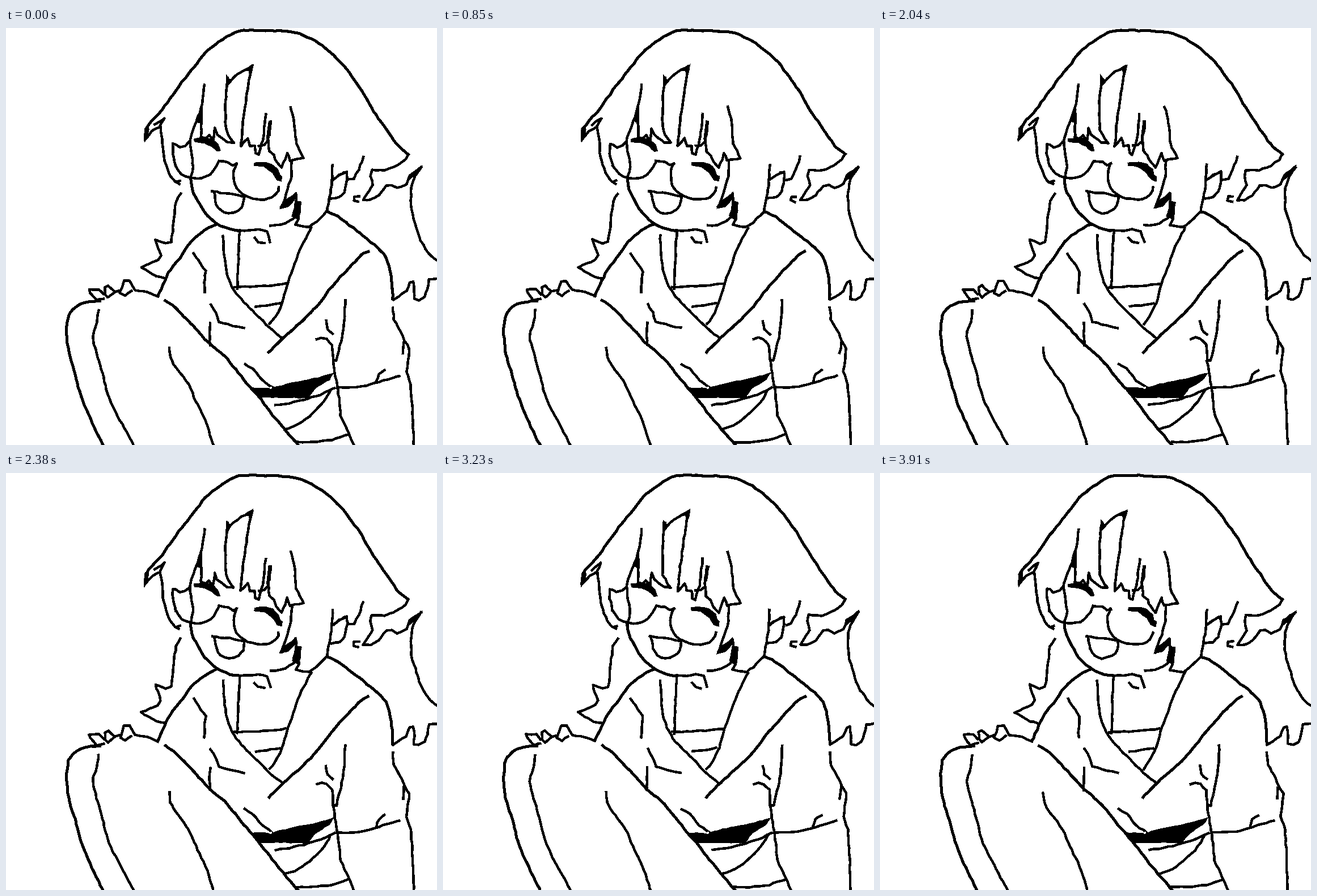
Recreate the animation shown at these times as an HTML page. Size 760 by 737 pixels, loop 4.08 s.

```html
<!DOCTYPE html>
<html lang="en">
<head>
<meta charset="utf-8">
<title>Boiling line drawing</title>
<style>
  html, body { margin: 0; width: 100%; height: 100%; overflow: hidden; background: #fff; }
  svg { display: block; width: 100vw; height: 100vh; }
  polyline { fill: none; stroke: #000; stroke-width: 4.5; stroke-linecap: square; stroke-linejoin: round; }
  .bold { stroke-width: 5.1; }
  polygon { fill: #000; stroke: #000; stroke-width: 1.5; }
</style>
</head>
<body>
<svg viewBox="0 0 760 737" preserveAspectRatio="none" shape-rendering="crispEdges">
  <!-- "soft" lines are curves through their points, the others keep their corners -->
  <g id="hair">
    <polyline class="soft bold" points="247,178 258,163 270,151 285,131 300,110 325,77 337,63 352,43 375,25 395,12 412,5 440,4 465,5 490,6 517,10 545,23 565,37 590,60 610,86 628,111 645,141 665,171 680,193 692,209 709,223"/>
    <polyline points="709,223 704,233 690,243 668,252 645,251 643,262 647,278 640,288 630,304 643,304 657,296 670,279 680,278 690,283 696,281 706,276 712,262 732,246"/>
    <polygon points="707,272 711,259 734,243 720,261"/>
    <polyline class="soft" points="732,246 722,262 715,283 715,320 722,345 731,375 736,384 748,401 760,411"/>
    <polyline points="760,443 746,444 743,462 738,475 728,481 719,479 720,465 718,448 712,450 706,465 692,474 683,480"/>
    <polyline points="622,298 614,298 613,305 621,307"/>
    <polyline points="247,178 245,197 258,182 271,175 279,159 263,171"/>
    <polygon points="244,201 245,178 252,173 251,186"/>
    <polyline class="soft" points="272,176 275,195 277,220 282,242 290,261 298,272 305,275"/>
    <polyline points="300,272 306,270"/>
    <polyline points="308,293 300,306 296,335 294,360 291,378 282,381 264,374 268,388 273,402 268,410 238,423 250,430 265,439 279,442"/>
  </g>
  <g id="bangs">
    <polyline class="soft" points="350,100 347,125 341,150 330,180 324,200 327,225 330,245 326,262"/>
    <polygon points="346,138 338,166 346,168"/>
    <polyline points="344,145 344,190"/>
    <polyline points="344,193 352,195 358,190 364,198 365,203 368,177 372,188 380,194 390,202 402,203 396,196 388,180 387,160 387,130 391,88"/>
    <polyline points="391,100 400,89 415,77 434,67 430,85 425,115 422,140 418,165 414,209 426,195 430,208 438,208 440,221 445,224 448,213 453,198 455,178 458,152"/>
    <polygon points="389,84 397,93 388,102"/>
    <polygon points="420,75 436,65 430,84 428,75"/>
    <polyline points="467,166 463,185 462,200 455,207 446,208"/>
    <polygon points="464,164 469,164 466,190 460,195"/>
    <polyline points="462,195 464,218 472,225 477,236 486,247 492,232 496,221 501,234 525,230 518,217 512,205 508,160 502,140"/>
    <polyline points="504,237 503,262 497,285 488,311 485,317 497,313 511,293 512,308 519,309 516,338 511,348 522,350 535,352 547,343 566,324"/>
    <polygon points="483,319 490,306 503,298 511,291 510,302 498,315"/>
    <polygon points="510,306 520,308 517,339 505,332 509,318"/>
  </g>
  <g id="face">
    <polyline points="322,202 316,208 306,211 300,206 294,205 294,222 299,243"/>
    <polyline class="soft" points="299,243 310,258 327,265 345,265 360,259 371,245 376,235"/>
    <polyline points="376,235 392,237 400,243 407,240"/>
    <polyline class="soft" points="407,240 402,252 402,270 407,283 418,294 435,301 455,303 470,299 480,288 481,282"/>
    <polygon points="332,196 352,194 365,198 374,206 378,217 373,218 363,209 350,203 332,201"/>
    <polygon points="438,238 457,237 470,241 480,250 483,260 487,262 486,271 478,268 470,256 455,245 438,243"/>
    <polyline class="soft bold" points="325,266 328,285 338,305 350,325 370,344 395,356 412,358"/>
    <polyline class="soft" points="467,349 485,348 500,341 510,333"/>
    <polyline points="412,358 430,358 445,356 460,359 466,378"/>
    <polyline points="439,371 445,378 455,380"/>
    <polyline points="364,288 378,291 395,292 418,297"/>
    <polyline class="soft" points="420,299 418,313 410,322 392,328 378,322 371,311 367,291"/>
    <polyline class="soft" points="576,242 575,262 573,285 570,300 566,324"/>
    <polyline points="576,268 588,260 601,254 602,266 597,290 588,299 574,301"/>
    <polygon points="577,270 595,254 602,253 588,262"/>
    <polyline points="605,268 614,266 622,250 630,228"/>
  </g>
  <g id="top">
    <polyline class="soft" points="538,353 525,378 515,400 507,425 497,450 487,485 475,510 465,523"/>
    <polyline class="soft bold" points="567,325 580,330 600,344 630,368 655,388 670,405 678,430 681,455 682,478"/>
    <polyline class="soft bold" points="638,395 630,399 615,413 590,440 570,463 548,492 520,520 490,547 464,573"/>
    <polyline class="soft" points="383,367 385,400 390,435 402,463 420,485 440,505 465,530 487,548"/>
    <polyline points="412,361 410,400 408,460"/>
    <polyline points="404,458 430,457 470,455 493,452"/>
    <polyline points="441,492 460,490 482,486"/>
    <polyline class="soft bold" points="371,347 350,358 326,378 311,400 290,427 280,447 268,473"/>
    <polyline points="331,399 340,412 352,430 350,450 350,467"/>
    <polyline points="361,488 370,503 375,519 400,526 419,530"/>
    <polyline points="360,521 359,540 360,560"/>
    <polyline points="421,594 435,602 452,623 470,635"/>
    <polygon points="432,636 465,637 500,628 550,618 577,610 570,621 545,637 532,654 500,653 446,653"/>
    <polyline points="475,666 500,663 525,657 555,648 579,636"/>
    <polyline class="soft" points="572,641 560,661 535,686 510,703 491,709"/>
    <polyline points="514,732 540,732 575,728 605,718"/>
  </g>
  <g id="arms">
    <polyline points="598,482 597,510 594,540 587,570 583,588 577,587 575,560 565,550 556,547 548,550"/>
    <polyline points="564,518 567,533 576,541"/>
    <polyline points="577,588 580,610 584,632 587,655 590,685 604,715 613,737"/>
    <polyline class="soft" points="584,635 610,635 635,632 665,623 694,615"/>
    <polyline points="653,625 657,612 667,605"/>
    <polyline points="682,494 684,515 698,540 703,553 711,566 710,580 706,607 714,630 717,680 719,739"/>
    <polyline points="702,556 700,575"/>
    <polyline points="268,474 250,467 228,463 218,447 208,447 205,458 201,468 210,473 221,465"/>
    <polyline points="192,466 180,455 174,458 175,471 180,476 192,466 200,464"/>
    <polyline points="172,478 160,481 149,468 147,462 164,462 172,470"/>
  </g>
  <g id="legs">
    <polyline class="soft bold" points="165,482 140,485 124,492 113,503 109,515 107,540 111,575 122,613 135,658 155,705 172,739"/>
    <polyline class="soft" points="163,499 160,520 153,545 160,575 170,610 182,655 205,700 226,739"/>
    <polyline class="soft" points="288,565 290,582 300,600 322,630 335,660 352,695 366,739"/>
    <polyline class="soft bold" points="281,482 295,491 320,516 345,543 360,559 385,580 405,603 425,628 445,651 470,684 490,708 515,737"/>
  </g>
  <circle cx="467" cy="636" r="2" fill="#fff"/>
</svg>
<script>
const STEP = 170, POSES = 24, GAP = 8, WOBBLE = 0.8;

function random(seed) {
  return () => {
    seed = (seed + 0x6D2B79F5) | 0;
    let t = Math.imul(seed ^ (seed >>> 15), seed | 1);
    t ^= t + Math.imul(t ^ (t >>> 7), t | 61);
    return ((t ^ (t >>> 14)) >>> 0) / 4294967296;
  };
}

// Catmull-Rom value between b and c
function spline(a, b, c, d, t) {
  return b + 0.5 * t * (c - a + t * (2 * a - 5 * b + 4 * c - d + t * (3 * (b - c) + d - a)));
}

function resample(points, soft) {
  const out = [], last = points.length - 1;
  for (let i = 0; i < last; i++) {
    const b = points[i], c = points[i + 1];
    const a = points[i - 1] || b, d = points[i + 2] || c;
    const parts = Math.max(1, Math.round(Math.hypot(c[0] - b[0], c[1] - b[1]) / GAP));
    for (let k = 0; k < parts; k++) {
      const t = k / parts;
      out.push([0, 1].map(n => soft ? spline(a[n], b[n], c[n], d[n], t) : b[n] + (c[n] - b[n]) * t));
    }
  }
  out.push(points[last]);
  return out;
}

const lines = [...document.querySelectorAll("polyline, polygon")].map(el => {
  const points = el.getAttribute("points").split(" ").map(p => p.split(",").map(Number));
  return { el, points: resample(points, el.classList.contains("soft")) };
});

function draw(pose) {
  const rnd = random(pose * 7919 + 17);
  const shake = () => (rnd() * 2 - 1) * WOBBLE;
  for (const { el, points } of lines) {
    const text = points.map(([x, y]) => (x + shake()).toFixed(1) + "," + (y + shake()).toFixed(1));
    el.setAttribute("points", text.join(" "));
  }
}

let shown = 0;
const start = performance.now();
function tick(now) {
  const pose = Math.floor(Math.max(0, now - start) / STEP) % POSES;
  if (pose !== shown) draw(shown = pose);
  requestAnimationFrame(tick);
}
draw(0);
requestAnimationFrame(tick);
</script>
</body>
</html>
```
